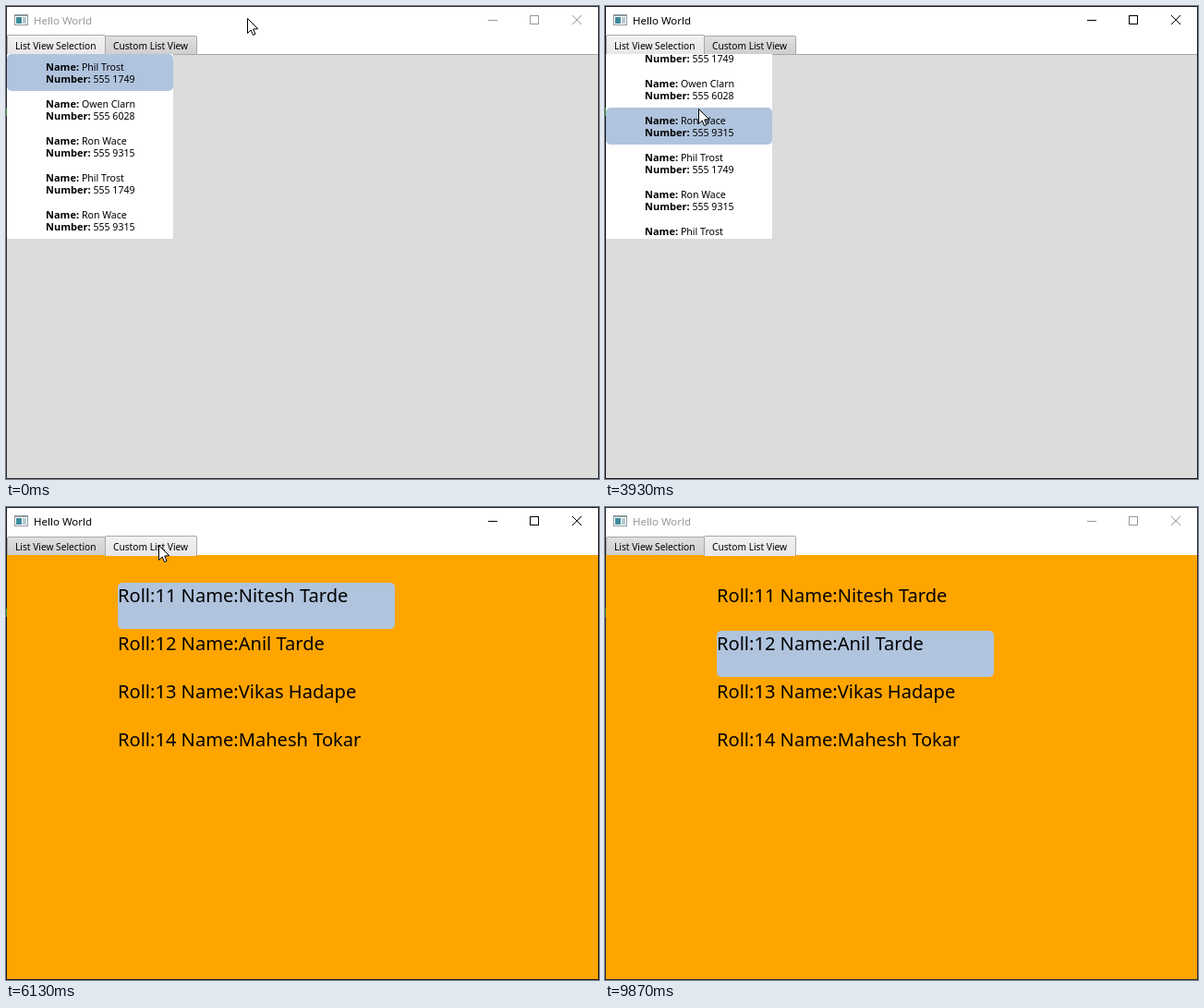
An HTML page with a canvas that plays this animation: 642x512 px, repeating every 9940 ms.

```html
<!DOCTYPE html>
<html lang="en">
<head>
<meta charset="utf-8">
<title>Hello World</title>
<style>
  html, body { margin: 0; width: 642px; height: 512px; overflow: hidden; }
  canvas { display: block; }
</style>
</head>
<body>
<canvas id="stage" width="642" height="512"></canvas>
<script>
const ctx = document.getElementById('stage').getContext('2d');
const LOOP = 9940, STEP = 1000 / 15;
const FACE = '"Noto Sans", "Open Sans", sans-serif';
const STEEL = '#b0c4de';
const ROW = 40, VIEW = 200, SPEED = 0.4; // px, px, px per ms

const phil = ['Phil Trost', '555 1749'];
const owen = ['Owen Clarn', '555 6028'];
const ron = ['Ron Wace', '555 9315'];
const contacts = [phil, owen, ron, phil, ron, phil];
const students = ['Nitesh Tarde', 'Anil Tarde', 'Vikas Hadape', 'Mahesh Tokar'];

// When the arrow keys send the highlight to which row.
const keys = [
  [2053, 2], [2710, 4], [3190, 5], [3290, 0.55], [3735, 2],
  [4170, 3], [4370, 4], [4820, 5], [5039, 0]
];
const clicks = [7100, 7700, 8300, 8840];
// Mouse trips: start, end, x, y.
const trips = [
  [200, 867, -3, 520], [1400, 1930, 101, 111], [5540, 6000, 165, 41],
  [6130, 6870, 190, 99], [7860, 8070, 188, 134], [8890, 9600, 50, 520]
];

const clamp = (v, lo, hi) => Math.min(hi, Math.max(lo, v));

function ease(u) {
  u = clamp(u, 0, 1);
  return u < 0.5 ? 2 * u * u : 1 - 2 * (1 - u) ** 2;
}

// The highlight glides at constant speed and drags the view along.
function listState(t) {
  let pos = 0, scroll = 0;
  for (const [start, row] of keys) {
    const reach = Math.max(0, t - start) * SPEED;
    pos += clamp(row * ROW - pos, -reach, reach);
    scroll = clamp(scroll, pos + ROW - VIEW, pos);
  }
  return { pos: Math.round(pos), scroll: Math.round(scroll) };
}

function pointerAt(t) {
  let x = 261, y = 13;
  for (const [start, end, toX, toY] of trips) {
    const u = clamp((t - start) / (end - start), 0, 1);
    x += (toX - x) * u;
    y += (toY - y) * u;
  }
  return [Math.round(x), Math.round(y)];
}

function rect(x, y, w, h, color) {
  ctx.fillStyle = color;
  ctx.fillRect(x, y, w, h);
}

function rounded(x, y, w, h, radius, color) {
  ctx.fillStyle = color;
  ctx.beginPath();
  ctx.roundRect(x, y, w, h, radius);
  ctx.fill();
}

function text(str, x, y, font, color = '#000') {
  ctx.font = `${font} ${FACE}`;
  ctx.fillStyle = color;
  ctx.fillText(str, x, y);
  return ctx.measureText(str).width;
}

function drawWindow(active) {
  const ink = active ? '#000' : '#999';
  rect(0, 0, 642, 512, active ? '#181818' : '#2b2b2b');
  rect(0, 110, 1, 9, '#3c8a3c');
  rect(1, 1, 640, 510, '#fff');

  rect(9, 9, 15, 12, '#8f9aa0');
  rect(10, 11, 13, 9, '#fff');
  rect(11, 12, 6, 7, '#3d8a9c');
  rect(18, 12, 4, 7, '#b4c9d0');

  text('Hello World', 30, 20, '11.5px', ink);
  rect(522, 15, 10, 1, ink);
  ctx.strokeStyle = ink;
  ctx.lineWidth = 1;
  ctx.strokeRect(567.5, 10.5, 9, 9);
  ctx.beginPath();
  ctx.moveTo(613, 10);
  ctx.lineTo(623, 20);
  ctx.moveTo(623, 10);
  ctx.lineTo(613, 20);
  ctx.stroke();
}

function drawTab(label, x, w, selected) {
  const top = selected ? 31 : 32, h = selected ? 22 : 20;
  const fill = ctx.createLinearGradient(0, top, 0, top + h);
  fill.addColorStop(0, selected ? '#f2f2f2' : '#e0e0e0');
  fill.addColorStop(1, selected ? '#e6e6e6' : '#cfcfcf');
  rounded(x, top, w, h, [2, 2, 0, 0], '#a8a8a8');
  rounded(x + 1, top + 1, w - 2, h - 1, [1, 1, 0, 0], fill);
  text(label, x + 9, 47, '10.2px');
}

function drawTabs(front) {
  const tabs = [['List View Selection', 1, 107], ['Custom List View', 107, 100]];
  drawTab(...tabs[1 - front], false);
  drawTab(...tabs[front], true);
}

function drawContacts(t) {
  const { pos, scroll } = listState(t);
  ctx.save();
  ctx.beginPath();
  ctx.rect(1, 52, 180, VIEW);
  ctx.clip();
  rect(1, 52, 180, VIEW, '#fff');
  rounded(1, 52 + pos - scroll, 180, ROW, 5, STEEL);
  contacts.forEach((contact, i) => {
    ['Name: ', 'Number: '].forEach((label, line) => {
      const y = 70 + ROW * i + 13 * line - scroll;
      const w = text(label, 43, y, 'bold 11px');
      text(contact[line], 43 + w, y, '10.6px');
    });
  });
  ctx.restore();
}

function drawStudents(t) {
  const second = ease((t - 8274) / 95);
  const isOpen = clicks.filter(click => click <= t).length % 2 === 1;
  const open = isOpen ? Number(t > 8000) : -1;
  // Each click grows or shrinks the highlight in turn.
  const growth = clicks.reduce(
    (sum, click, i) => sum + (i % 2 ? -1 : 1) * ease((t - click) / 125), 0);

  rounded(121, 82 + Math.round(52 * second), 300, 50 + Math.round(50 * growth), 5, STEEL);
  let y = 103;
  students.forEach((name, i) => {
    const roll = `Roll:${11 + i}`;
    text(`${roll} Name:${name}`, 121, y, '20.1px');
    if (i === open) {
      text(roll, 121, y + 50, '20.1px');
      text(`Name:${name}`, 121, y + 75, '20.1px');
      y += 50;
    }
    y += 52;
  });
}

function drawPointer(x, y) {
  ctx.save();
  ctx.translate(x + 0.5, y + 0.5);
  ctx.fillStyle = '#fff';
  ctx.strokeStyle = '#000';
  const arrow = new Path2D('M0 0V16L3.7 12.5L6 18L8.5 17L6.2 11.5L11.2 11.2Z');
  ctx.fill(arrow);
  ctx.stroke(arrow);
  ctx.restore();
}

function draw(t) {
  drawWindow(t >= 1460 && t < 9860);
  if (t < 6130) {
    rect(1, 52, 640, 459, '#dcdcdc');
    rect(1, 52, 640, 1, '#a8a8a8');
    drawTabs(0);
    drawContacts(t);
  } else {
    rect(1, 52, 640, 459, '#ffa500');
    drawTabs(1);
    drawStudents(t);
  }
  drawPointer(...pointerAt(t));
}

function tick() {
  const t = performance.now() % LOOP;
  // The picture advances fifteen times a second.
  draw(Math.min(148, Math.floor((t + 4) / STEP)) * STEP);
  requestAnimationFrame(tick);
}
tick();
</script>
</body>
</html>
```
